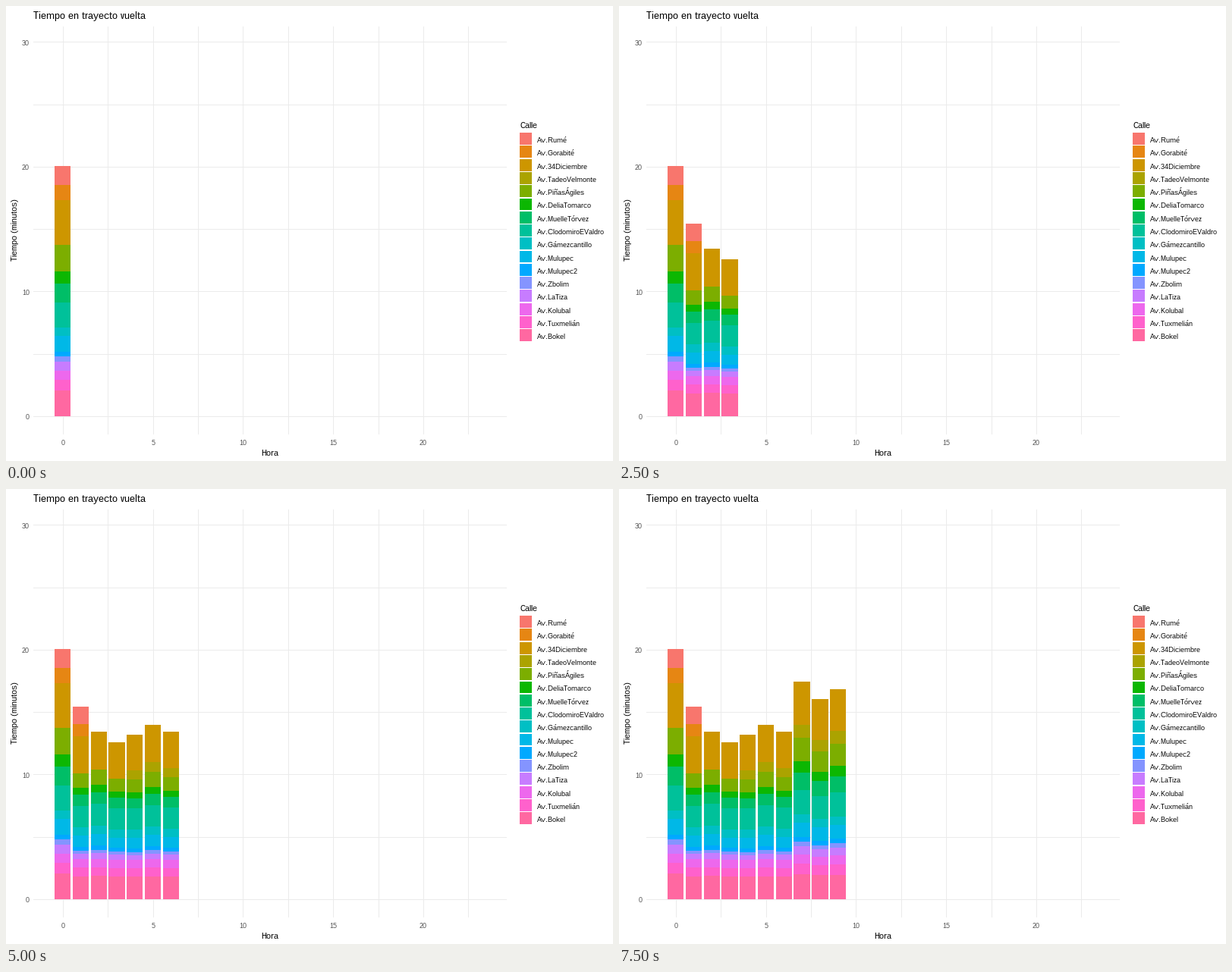
Recreate the animation shown at these times as a matplotlib script. Size 800 by 600 pixels, loop 8000 ms.

```python
import math

import matplotlib
import matplotlib.pyplot as plt
import numpy as np
from matplotlib.animation import FuncAnimation
from matplotlib.collections import PolyCollection

matplotlib.rcParams.update({
    "font.family": "Liberation Sans",
    "text.hinting": "native",
    "text.hinting_factor": 1,
    "text.kerning_factor": 6,
})

W, H, DPI = 800, 600, 100
STEP = 20                        # ms per drawn frame
LOOP = 8000
LEFT, RIGHT, TOP, BOTTOM = 36, 660, 27, 565
X0, X_UNIT = 74.67, 23.768       # pixel of hour 0, pixels per hour
Y0, Y_UNIT = 541, 16.455         # pixel of minute 0, pixels per minute
GRID, TICK = "#EBEBEB", "#4D4D4D"

# Street, bar pixels in calm traffic, extra pixels in heavy traffic
STREETS = [
    ("Av.Rumé", 23, 2),
    ("Av.Gorabité", 16, 3),
    ("Av.34Diciembre", 48, 9),
    ("Av.TadeoVelmonte", 12, 5),
    ("Av.PiñasÁgiles", 18, 14),
    ("Av.DeliaTomarco", 8, 7),
    ("Av.MuelleTórvez", 14, 9),
    ("Av.ClodomiroEValdro", 28, 4),
    ("Av.Gámezcantillo", 11, 0),
    ("Av.Mulupec", 14, 6),
    ("Av.Mulupec2", 5, 1),
    ("Av.Zbolim", 4, 2),
    ("Av.LaTiza", 7, 4),
    ("Av.Kolubal", 11, 1),
    ("Av.Tuxmelián", 11, 3),
    ("Av.Bokel", 30, 3),
]
BAR_TOPS = [211, 287, 320, 334, 324, 311, 320, 254, 277, 264]

fig = plt.figure(figsize=(W / DPI, H / DPI), dpi=DPI, facecolor="white")
ax = fig.add_axes([0, 0, 1, 1])
ax.set_xlim(0, W)
ax.set_ylim(H, 0)
ax.axis("off")


def hcl(hue, chroma=100, lum=65):
    """Polar CIE-LUV colour as clipped sRGB."""
    h = math.radians(hue)
    y = ((lum + 16) / 116) ** 3
    u = chroma * math.cos(h) / (13 * lum) + 0.19784
    v = chroma * math.sin(h) / (13 * lum) + 0.46834
    x = 9 * y * u / (4 * v)
    z = 3 * y / v - 5 * y - x / 3
    rgb = np.clip([3.2405 * x - 1.5372 * y - 0.4985 * z,
                   -0.9693 * x + 1.8760 * y + 0.0416 * z,
                   0.0556 * x - 0.2040 * y + 1.0573 * z], 0, 1)
    curve = 1.055 * rgb ** (1 / 2.4) - 0.055
    return tuple(np.where(rgb > 0.0031308, curve, 12.92 * rgb))


COLORS = [hcl(15 + 360 * i / len(STREETS)) for i in range(len(STREETS))]


def box(x0, y0, x1, y1):
    return [(x0, y0), (x1, y0), (x1, y1), (x0, y1)]


def add_boxes(boxes, colors, z):
    boxes = PolyCollection(boxes, facecolors=colors, linewidths=0,
                           antialiaseds=False, zorder=z)
    return ax.add_collection(boxes, autolim=False)


def label(x, y, text, px, color="black", ha="left", **kw):
    ax.text(x, y, text, fontsize=px * 72 / DPI, color=color, ha=ha,
            va="baseline", **kw)


def streets_at(hour):
    """Indices of the streets that make up the bar of this hour."""
    skipped = {3} if hour < 2 else {0, 1, 3} if hour < 4 else {0, 1}
    return [i for i in range(len(STREETS)) if i not in skipped]


def draw_grid():
    lines = []
    for k in range(10):
        x = round(X0 + 2.5 * k * X_UNIT)
        lines.append(box(x, TOP, x + 1, BOTTOM))
        if k % 2 == 0:
            label(x, 579, str(k * 5 // 2), 9, TICK, "center")
    for k in range(7):
        y = Y0 - 5 * k * Y_UNIT
        lines.append(box(LEFT, round(y), RIGHT, round(y) + 1))
        if k % 2 == 0:
            label(31, y + 4.4, str(k * 5), 9, TICK, "right")
    add_boxes(lines, GRID, 1)


def draw_titles():
    label(LEFT, 17, "Tiempo en trayecto vuelta", 13)
    label(347.5, 593, "Hora", 11, ha="center")
    label(15, 295, "Tiempo (minutos)", 11, ha="center",
          rotation=90, rotation_mode="anchor")


def draw_legend():
    label(677, 161, "Calle", 11)
    keys = []
    for i, (name, *_) in enumerate(STREETS):
        y = 167.12 + 17.28 * i
        keys.append(box(677, round(y), 693, round(y + 15.84)))
        label(700, round(y + 12.9), name, 9)
    add_boxes(keys, COLORS, 2)


def draw_bar(hour, top):
    ids = streets_at(hour)
    calm, extra = np.array([STREETS[i][1:] for i in ids]).T
    traffic = (Y0 - top - calm.sum()) / extra.sum()
    edges = top + np.cumsum([0, *(calm + traffic * extra)]).round()
    mid = X0 + hour * X_UNIT
    x0, x1 = round(mid - 0.45 * X_UNIT), round(mid + 0.45 * X_UNIT)
    parts = [box(x0, a, x1, b) for a, b in zip(edges, edges[1:])]
    return add_boxes(parts, [COLORS[i] for i in ids], 3)


draw_grid()
draw_titles()
draw_legend()
bars = [draw_bar(hour, top) for hour, top in enumerate(BAR_TOPS)]


def update(frame):
    # A new hour appears six times in every five seconds
    now = (frame * STEP + STEP - 1) * 6 // 5000
    for hour, bar in enumerate(bars):
        bar.set_visible(hour <= now)
    return bars


anim = FuncAnimation(fig, update, frames=LOOP // STEP, interval=STEP,
                     init_func=lambda: update(0), repeat=True, repeat_delay=0,
                     blit=False)
plt.show()
```
